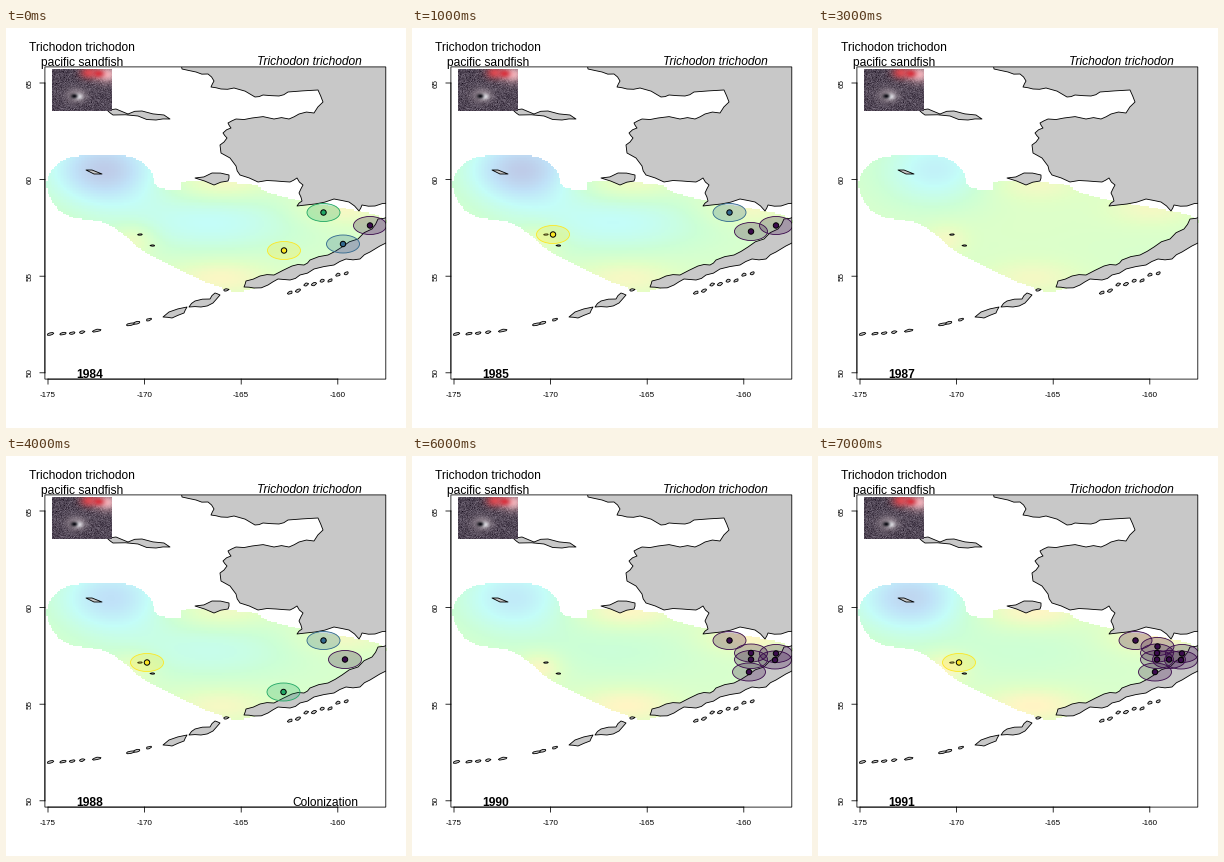
Write a matplotlib script that moves like this. It is 400x400 px and loops after 8000 ms.

```python
import numpy as np
import matplotlib.pyplot as plt
from matplotlib.animation import ArtistAnimation
from matplotlib.colors import LinearSegmentedColormap
from matplotlib.patches import Circle, Ellipse, Polygon, Rectangle
from matplotlib.path import Path

PX = 0.72  # points per pixel at 100 dpi
LEFT, RIGHT, TOP, BOTTOM = 38.9, 379.8, 38.9, 351.1
rng = np.random.default_rng(4)

plt.rcParams["font.family"] = "Liberation Sans"
fig = plt.figure(figsize=(4, 4), dpi=100, facecolor="white")
ax = fig.add_axes([0, 0, 1, 1])
ax.axis("off")
frame = Rectangle((LEFT, TOP), RIGHT - LEFT, BOTTOM - TOP, fc="none",
                  ec="black", lw=0.8 * PX, snap=False, zorder=6)
ax.add_patch(frame)


def text(x, y, s, size=12, **kw):
    kw = {"ha": "center", "va": "baseline", **kw}
    return ax.text(x, y, s, fontsize=size * PX, zorder=7, **kw)


def line(xs, ys):
    ax.plot(xs, ys, color="black", lw=0.8 * PX, snap=False, zorder=6)


# ---- coastline -------------------------------------------------------
def roughen(points, amount=0.1):
    """Split every edge and push its middle sideways a little."""
    p = np.array(points, float)
    edge = np.roll(p, -1, axis=0) - p
    normal = np.column_stack([-edge[:, 1], edge[:, 0]])
    mid = p + edge / 2 + normal * rng.uniform(-amount, amount, (len(p), 1))
    return np.stack([p, mid], axis=1).reshape(-1, 2)


def smooth(points, n=8):
    """Closed Catmull-Rom curve through the points."""
    b = np.array(points, float)
    a, c, d = (np.roll(b, k, axis=0) for k in (1, -1, -2))
    curve = [b + t / 2 * (c - a + t * (2 * a - 5 * b + 4 * c - d
                                       + t * (3 * (b - c) + d - a)))
             for t in np.arange(n) / n]
    return np.stack(curve, axis=1).reshape(-1, 2)


def land(points):
    patch = Polygon(points, fc="#c8c8c8", ec="black", lw=0.85 * PX,
                    joinstyle="round", zorder=2)
    ax.add_patch(patch)
    patch.set_clip_path(frame)


def islet(x, y, w, h, tilt=0.0):
    """Small ragged oval; tilt lifts its right end."""
    a = np.linspace(0, 2 * np.pi, 9)[:-1]
    r = rng.uniform(0.7, 1.1, a.size)
    dx = r * np.cos(a) * w / 2
    land(np.column_stack([x + dx, y + r * np.sin(a) * h / 2 - tilt * dx]))


mainland = [
    (176, 30), (176, 41), (190, 44), (202, 46), (208, 53), (205, 59),
    (215, 61), (228, 60), (249, 69), (257, 67), (273, 68), (282, 64),
    (312, 62), (317, 74), (308, 85), (293, 86), (283, 91), (268, 91),
    (246, 90), (230, 91), (222, 95), (225, 100), (217, 105), (221, 110),
    (214, 117), (215, 125), (224, 130), (230, 138), (234, 147), (252, 154),
    (270, 153), (284, 154), (291, 150), (297, 157), (293, 165), (296, 173),
    (291, 178), (309, 176), (328, 171), (343, 174), (353, 183), (356, 177),
    (369, 178), (384, 175), (384, 30)]
peninsula = [
    (384, 188), (372, 191), (366, 201), (352, 211), (336, 219), (322, 227),
    (304, 232), (298, 237), (286, 238), (268, 247), (254, 248), (240, 253),
    (238, 259), (248, 260), (262, 257), (272, 251), (284, 252), (294, 247),
    (308, 241), (328, 237), (340, 231), (354, 231), (364, 224), (384, 213)]
nunivak = [(189, 150), (206, 145), (223, 147), (222, 153), (208, 157)]
lawrence = [(102, 83), (110, 81), (122, 86), (136, 83), (158, 87),
            (164, 91), (150, 92), (132, 88), (107, 87)]
umnak = [(157, 289), (163, 284), (181, 279), (178, 285), (166, 290)]
unalaska = [(183, 279), (189, 273), (204, 271), (209, 265), (214, 267),
            (207, 275), (195, 279)]
for shape in (mainland, peninsula, nunivak, lawrence, umnak, unalaska):
    land(roughen(shape))

land([(80, 142), (86, 142), (96, 146), (88, 146)])
islet(134, 206.5, 5, 1.5)
islet(146.5, 217.5, 5, 1.5)
for x in (44, 57, 66, 76, 91, 125, 131, 143, 220):
    arc = 306 - 44 * ((x - 40) / 180) ** 2
    islet(x, arc, rng.uniform(5, 10), 2.5, 0.2)
for x in range(284, 345, 8):
    islet(x, 264 - (x - 284) * 0.32 + rng.uniform(-3, 3), 5, 3, 0.3)

# ---- temperature field -----------------------------------------------
survey_area = smooth([
    (41, 155), (48, 140), (64, 130), (95, 127), (128, 130), (145, 143),
    (152, 159), (174, 162), (178, 154), (205, 154), (248, 157), (260, 164),
    (290, 172), (312, 176), (352, 183), (377, 190), (374, 200), (300, 238),
    (240, 263), (208, 257), (180, 245), (140, 225), (118, 207), (98, 195),
    (62, 188), (46, 173)])
pastel = LinearSegmentedColormap.from_list("pastel", [
    "#bec8e6", "#c0e2f8", "#c4fdf8", "#ccffd6", "#e2ffc6", "#fff6c4",
    "#ffe2c4"])
STEP = 1.5
gx, gy = np.meshgrid(np.arange(39, 380, STEP) + STEP / 2,
                     np.arange(39, 351, STEP) + STEP / 2)
inside = Path(survey_area).contains_points(
    np.column_stack([gx.ravel(), gy.ravel()])).reshape(gx.shape)


def bump(x, y, rx, ry):
    return np.exp(-((gx - x) / rx) ** 2 - ((gy - y) / ry) ** 2)


coast = (bump(215, 155, 48, 18) + bump(215, 250, 50, 18)
         + bump(128, 212, 22, 16) + bump(335, 180, 45, 18))
# strength and x of the northern cold pool, mid-shelf chill, coastal warmth
climate = {1984: (3.4, 98, 1.6, 1.3), 1986: (3.4, 122, 1.6, 1.0),
           1987: (2.0, 118, -0.2, 1.0), 1988: (2.6, 105, 1.2, 1.1),
           1989: (1.5, 112, 0.8, 1.4), 1991: (3.0, 92, 0.5, 1.5)}
for year in (1985, 1990):
    climate[year] = np.mean([climate[year - 1], climate[year + 1]], axis=0)


def field(year):
    pool, pool_x, chill, warm = climate[year]
    level = (3.6 + warm * coast - pool * bump(pool_x, 142, 55, 36)
             - chill * bump(205, 195, 90, 30))
    rgba = pastel(np.clip(level / 6, 0, 1))
    rgba[..., 3] = inside
    h, w = gx.shape
    return ax.imshow(rgba, extent=(39, 39 + STEP * w, 39 + STEP * h, 39),
                     interpolation="nearest", aspect="auto", zorder=1)


# ---- catches ---------------------------------------------------------
YELLOW, GREEN, BLUE, DARK = "#fde725", "#22a866", "#31688e", "#3a0a4c"
pribilof, togiak, heiden = (141, 206.5), (317.5, 184.5), (337, 216)
bay, outer = (339, 203.5), (364, 197.5)
school = [togiak, (339, 197), outer, bay, (363, 204), heiden]

catches = {
    1984: [((278, 222.5), YELLOW), (togiak, GREEN), (heiden, BLUE),
           (outer, DARK)],
    1985: [(pribilof, YELLOW), (togiak, BLUE), (bay, DARK), (outer, DARK)],
    1986: [(pribilof, YELLOW), ((339.5, 190.5), DARK), ((326, 203.5), DARK),
           (bay, DARK)],
    1987: [],
    1988: [(pribilof, YELLOW), (togiak, BLUE), (bay, DARK),
           ((277.5, 236), GREEN)],
    1989: [(p, DARK) for p in school + [(315.5, 191), (364.5, 191),
                                        (349, 210)]],
    1990: [(p, DARK) for p in school],
    1991: [(p, DARK) for p in school + [(339.5, 190.5), (351, 203.5)]]
          + [(pribilof, YELLOW)],
}
events = {1986: "Extinction", 1988: "Colonization"}


def catch(spot, color):
    halo = Ellipse(spot, 33, 18, fc=(color, 0.25), ec=color,
                   lw=0.85 * PX, zorder=3)
    dot = Circle(spot, 2.7, fc=color, ec="black", lw=PX, zorder=4)
    for patch in (halo, dot):
        ax.add_patch(patch)
        patch.set_clip_path(frame)
    return [halo, dot]


# ---- photo as soft shapes --------------------------------------------
def photo(x0, y0, x1, y1):
    v, u = np.mgrid[0:1:42j, 0:1:60j]
    rgb = np.array([.32, .28, .34]) + rng.normal(0, .06, (42, 60, 1))
    for cx, cy, r, color in [(.62, .08, .14, "#d84048"),
                             (.92, .12, .2, "#f2b8c0"),
                             (.78, .1, .1, "#d83440"),
                             (.4, .63, .17, "#9c8e98"),
                             (.44, .66, .07, "#f2f2f8"),
                             (.37, .65, .06, "#0c0c14")]:
        tint = np.array([int(color[i:i + 2], 16) for i in (1, 3, 5)]) / 255
        mix = np.exp(-((u - cx) ** 2 + (v - cy) ** 2) / r ** 2)[..., None]
        rgb = rgb * (1 - mix) + tint * mix
    ax.imshow(np.clip(rgb, 0, 1), extent=(x0, x1, y1, y0), aspect="auto",
              interpolation="bilinear", zorder=5)


photo(46, 41, 106, 83)

# ---- axes and titles -------------------------------------------------
xs = 42 + 96.6 * np.arange(4)
ys = 55 + 96.6 * np.arange(4)
line(xs[[0, -1]], [BOTTOM, BOTTOM])
line([LEFT, LEFT], ys[[0, -1]])
for i, (x, y) in enumerate(zip(xs, ys)):
    line([x, x], [BOTTOM, BOTTOM + 5])
    line([LEFT - 5, LEFT], [y, y])
    text(x, 369, str(5 * i - 175), 8)
    text(24.5, y, str(65 - 5 * i), 8, rotation=90, va="center")

text(76, 23, "Trichodon trichodon")
text(76, 38, "pacific sandfish")
text(303.7, 37, "Trichodon trichodon", style="italic")


def scene(year):
    artists = [field(year)]
    for spot, color in catches[year]:
        artists += catch(spot, color)
    artists.append(text(84, 350, str(year), weight="bold"))
    if year in events:
        artists.append(text(352.2, 350, events[year], ha="right"))
    return artists


scenes = [scene(year) for year in range(1984, 1992)]
ax.set_xlim(0, 400)
ax.set_ylim(400, 0)
anim = ArtistAnimation(fig, scenes, interval=1000, repeat=True,
                       repeat_delay=0, blit=False)
plt.show()
```
